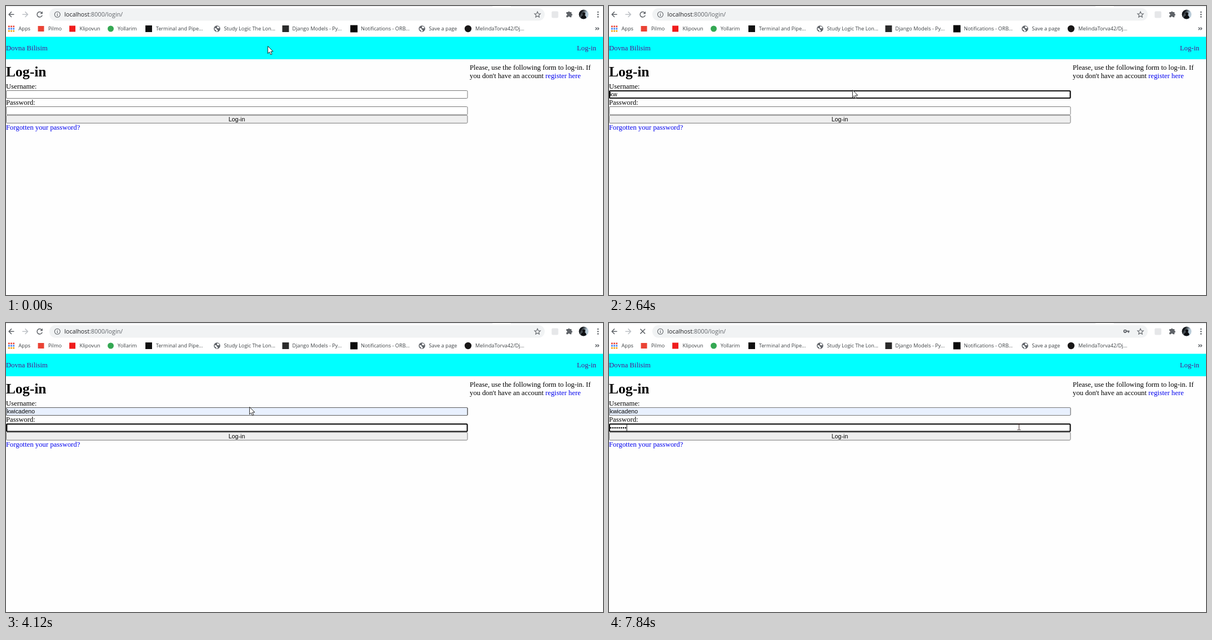
An HTML page that plays this animation: 1075 by 521 pixels, repeating every 8000 ms.

```html
<!DOCTYPE html>
<html lang="en">
<head>
<meta charset="utf-8">
<title>Log-in</title>
<style>
html, body { margin: 0; width: 100%; height: 100%; overflow: hidden; background: #fefefe; }
svg { display: block; width: 1075px; height: 521px; }
.ui { font-family: "Open Sans", "Noto Sans", sans-serif; fill: #3c4043; }
.marks { font-size: 9.2px; }
.url { font-size: 10.8px; fill: #5f6368; }
.page { font: 12.8px "Liberation Serif", serif; fill: #000; }
.page h1, .head { font-size: 25.6px; font-weight: bold; }
.link { fill: #0000ee; }
.seen { fill: #551a8b; }
.field { font: 10.67px "Liberation Sans", sans-serif; fill: #000; }
.list { font-size: 10.1px; fill: #202124; }
.line { fill: none; stroke: #5f6368; stroke-width: 1.5; }
.box { fill: #fff; stroke: #767676; }
.focus { fill: none; stroke: #101010; stroke-width: 2; }

/* one timeline of 8 s, hard changes unless a keyframe says otherwise */
.t { animation: 8s step-end infinite; }
.off { opacity: 0; }
#arrow { animation-name: arrow; }
#beam { animation-name: beam; }
#halo { animation-name: halo; }
#hoverUser { animation-name: hoverUser; }
#focusUser { animation-name: focusUser; }
#caretUser { animation-name: caretUser; }
#typed { animation-name: typed; }
#filled { animation-name: filled; }
#menu { animation-name: menu; }
#pick { animation-name: pick; }
#focusPass { animation-name: focusPass; }
#cover { animation-name: cover; }
#caretPass { animation-name: caretPass; }
#key { animation-name: key; }
#reload { animation-name: reload; }
#stop { animation-name: stop; }
#hoverBtn { animation-name: hoverBtn; }

@keyframes arrow {
  0% { transform: translate(471px, 72px); opacity: 1; }
  .875% { transform: translate(465px, 80px); }
  3.25% { transform: translate(465px, 80px); animation-timing-function: steps(10, jump-both); }
  12.5% { transform: translate(438px, 151px); }
  94.125% { transform: translate(478px, 164px); }
  95.125% { transform: translate(575px, 192px); }
  96.125% { transform: translate(655px, 205px); }
  97% { transform: translate(711px, 200px); }
  98% { transform: translate(738px, 187px); opacity: 0; }
  100% { opacity: 0; }
}
@keyframes beam { 0% { opacity: 0; } 98%, 100% { opacity: 1; } }
@keyframes halo { 0% { opacity: 0; } 13.625% { opacity: .62; } 14.625%, 100% { opacity: 0; } }
@keyframes hoverUser { 0% { opacity: 0; } 12.5% { opacity: 1; } 95.125%, 100% { opacity: 0; } }
@keyframes focusUser { 0% { opacity: 0; } 14.625% { opacity: 1; } 51.5%, 100% { opacity: 0; } }
@keyframes caretUser {
  0% { opacity: 0; transform: none; }
  14.625% { opacity: 1; }
  22.25% { opacity: 0; }
  27% { opacity: 1; transform: translateX(13px); }
  33% { opacity: 0; }
  40.875% { opacity: 1; }
  47.5% { opacity: 0; }
  49.375% { opacity: 1; transform: translateX(50.4px); }
  51.5%, 100% { opacity: 0; }
}
@keyframes typed { 0% { opacity: 0; } 27% { opacity: 1; } 47.5%, 100% { opacity: 0; } }
@keyframes filled { 0% { opacity: 0; } 47.5%, 100% { opacity: 1; } }
@keyframes menu { 0% { opacity: 0; } 37.75% { opacity: 1; } 49.375%, 100% { opacity: 0; } }
@keyframes pick { 0% { opacity: 0; } 46.5%, 100% { opacity: 1; } }
@keyframes focusPass { 0% { opacity: 0; } 51.5%, 100% { opacity: 1; } }
@keyframes cover {
  0% { transform: translateX(0); }
  65% { transform: translateX(3.78px); }
  69.875% { transform: translateX(7.56px); }
  70.875% { transform: translateX(11.34px); }
  73.75% { transform: translateX(15.12px); }
  75.875% { transform: translateX(18.9px); }
  77.75% { transform: translateX(22.68px); }
  80.625% { transform: translateX(26.46px); }
  82.5%, 100% { transform: translateX(30.24px); }
}
@keyframes caretPass {
  0% { opacity: 0; }
  51.5% { opacity: 1; }
  58.375% { opacity: 0; }
  65% { opacity: 1; }
  89.5% { opacity: 0; }
  96.125%, 100% { opacity: 1; }
}
@keyframes key { 0% { opacity: 0; } 67.125%, 100% { opacity: 1; } }
@keyframes reload { 0% { opacity: 1; } 90.625%, 100% { opacity: 0; } }
@keyframes stop { 0% { opacity: 0; } 90.625%, 100% { opacity: 1; } }
@keyframes hoverBtn { 0% { opacity: 0; } 95.125% { opacity: 1; } 98%, 100% { opacity: 0; } }
</style>
</head>
<body>
<svg viewBox="0 0 1075 521" xmlns="http://www.w3.org/2000/svg">
  <defs>
    <linearGradient id="photo" x1="0" y1="0" x2="1" y2=".6">
      <stop offset=".3" stop-color="#15181c"/>
      <stop offset=".75" stop-color="#b9cbd8"/>
    </linearGradient>
    <filter id="soft" x="-10%" y="-10%" width="120%" height="120%">
      <feDropShadow dx="0" dy="1" stdDeviation="1.1" flood-opacity=".4"/>
    </filter>
    <g id="globe">
      <circle r="5.8" fill="#5f6368"/>
      <path d="M-4.2-1.6l3.4 1.2.4 1.8 2 1-.8 2.4-2 .2-.6-2.2-2.4-1.4zM.2-4.4l3 .6 1.2 2.6-2.4.8-2.2-1.4z" fill="#fff"/>
    </g>
  </defs>

  <!-- browser bar -->
  <rect width="1075" height="55" fill="#fff"/>
  <path d="M0 .5h876M909 .5h166" stroke="#e3e5e9"/>
  <rect x="78" y="4" width="892" height="22.5" rx="11.2" fill="#f1f3f4"/>
  <g class="line">
    <path d="M14.6 15.2H5.2m4.8-4.8l-4.8 4.8 4.8 4.8"/>
    <path d="M29.4 15.2h9.8m-4.8-4.8l4.8 4.8-4.8 4.8" stroke="#bdc1c6"/>
    <g id="reload" class="t">
      <path d="M64.2 12.2A4.7 4.7 0 1 0 65.2 16.6"/>
      <path d="M65.9 9.6v4.6h-4.6z" fill="#5f6368" stroke="none"/>
    </g>
    <path id="stop" class="t off" d="M56.4 10.8l8.6 8.6m0-8.6l-8.6 8.6"/>
    <circle cx="92.5" cy="15.3" r="5" stroke-width="1.1"/>
    <path d="M92.5 14.6v3.4m0-5.6v1.2" stroke-width="1.2"/>
    <path d="M957 10.2l1.5 3.5 3.8.3-2.9 2.5.9 3.7-3.3-2-3.3 2 .9-3.7-2.9-2.5 3.8-.3z" stroke-width="1.1"/>
    <g id="key" class="t off">
      <circle cx="929.3" cy="14.8" r="2.2" stroke-width="1.8"/>
      <path d="M931.5 14.8h5.8m-1.8 0v2.9" stroke-width="1.9"/>
    </g>
  </g>
  <rect x="982.5" y="9.5" width="12" height="12" rx="2" fill="#e6e7e9"/>
  <path d="M1009 12h3a1.7 1.7 0 0 1 3.3 0h3v3.1a1.6 1.6 0 0 1 0 3.2v3h-3.1a1.6 1.6 0 0 0-3.2 0h-3v-3.1a1.6 1.6 0 0 0 0-3.2z" transform="translate(0 -1)" fill="#5f6368"/>
  <circle cx="1040.2" cy="15.2" r="8.6" fill="url(#photo)"/>
  <path d="M1035 21.8q.4-5 4-5.4a2.6 2.6 0 1 1 3 0q2.6.8 3 5.2-5 3.600-10 .2z" fill="#0e1013"/>
  <g fill="#5f6368"><circle cx="1066" cy="11" r="1.3"/><circle cx="1066" cy="15.3" r="1.3"/><circle cx="1066" cy="19.600" r="1.3"/></g>
  <text class="ui url" x="105" y="19"><tspan fill="#202124">localhost</tspan>:8000/login/</text>

  <!-- bookmarks -->
  <g stroke-width="2.8" stroke-dasharray="2.8 1.4">
    <path d="M4 36.800h11.200" stroke="#ea4335"/>
    <path d="M4 41h11.200" stroke="#4285f4"/>
    <path d="M4 45.200h11.200" stroke="#f4a20a"/>
  </g>
  <rect x="57.500" y="36" width="11" height="10" fill="#ea4335"/>
  <rect x="114" y="35.500" width="11" height="11" fill="#f01c1c"/>
  <circle cx="188.500" cy="41" r="5.500" fill="#34a853"/>
  <rect x="251" y="35" width="12" height="12" fill="#111"/>
  <use href="#globe" x="380" y="41"/>
  <rect x="497.500" y="35" width="12" height="12" fill="#2b2b2b"/>
  <rect x="620" y="34.500" width="13" height="13" fill="#0a0a0a"/>
  <use href="#globe" x="749" y="41"/>
  <circle cx="832" cy="41" r="6.200" fill="#191717"/>
  <g class="ui marks">
    <text x="22.500" y="44.300">Apps</text>
    <text x="76" y="44.300">Pilmo</text>
    <text x="132.500" y="44.300">Klipovun</text>
    <text x="201" y="44.300">Yollarim</text>
    <text x="270" y="44.300">Terminal and Pipe...</text>
    <text x="392.500" y="44.300">Study Logic The Lon...</text>
    <text x="515.500" y="44.300">Django Models - Py...</text>
    <text x="639" y="44.300">Notifications - ORB...</text>
    <text x="761.500" y="44.300">Save a page</text>
    <text x="845" y="44.300">MelindaTorva42/Dj...</text>
  </g>
  <path class="line" d="M1061.500 38.500l2.300 2.300-2.300 2.300m3.600-4.600l2.300 2.300-2.300 2.300" stroke-width="1.100"/>

  <!-- page -->
  <rect y="55.500" width="1075" height="40.500" fill="#0ff"/>
  <g class="page">
    <text class="seen" x="0" y="80">Dovna Bilisim</text>
    <text class="seen" x="1028" y="80">Log-in</text>
    <text class="head" x="0" y="127">Log-in</text>
    <text x="0" y="149">Username:</text>
    <text x="0" y="178.300">Password:</text>
    <text class="link" x="0" y="223">Forgotten your password?</text>
    <text x="835" y="115">Please, use the following form to log-in. If</text>
    <text x="835" y="129.700">you don't have an account <tspan class="link">register here</tspan></text>
  </g>

  <g class="field">
    <rect class="box" x=".5" y="152.500" width="830.500" height="14" rx="1.500"/>
    <text id="typed" class="t off" x="1.600" y="163">kw</text>
    <g id="filled" class="t off">
      <rect class="box" x=".5" y="152.500" width="830.500" height="14" rx="1.500" style="fill:#e8f0fe"/>
      <text x="1.600" y="163">kwicadeno</text>
    </g>
    <rect id="hoverUser" class="t off" x=".5" y="152.500" width="830.500" height="14" rx="1.500" fill="none" stroke="#5a5a5a"/>
    <rect id="focusUser" class="t off focus" x="1" y="153" width="829.500" height="13" rx="1.500"/>
    <rect id="caretUser" class="t off" x="1.400" y="153.500" width="1" height="12"/>

    <rect class="box" x=".5" y="181.500" width="830.500" height="14.500" rx="1.500"/>
    <path d="M3.290 189h26.500" stroke="#000" stroke-width="2.700" stroke-linecap="round" stroke-dasharray="0 3.780"/>
    <g id="cover" class="t">
      <rect x="1.900" y="184" width="34" height="10" fill="#fff"/>
      <rect id="caretPass" class="t off" x="1.400" y="183" width="1" height="12"/>
    </g>
    <rect id="focusPass" class="t off focus" x="1" y="182.300" width="829.500" height="13.200" rx="1.500"/>

    <rect x=".5" y="197" width="830.500" height="14.200" rx="1.800" fill="#efefef" stroke="#767676"/>
    <rect id="hoverBtn" class="t off" x=".5" y="197" width="830.500" height="14.200" rx="1.800" fill="#e5e5e5" stroke="#4f4f4f"/>
    <text x="415.500" y="207.800" text-anchor="middle">Log-in</text>
  </g>

  <!-- suggestions -->
  <g id="menu" class="t off">
    <path d="M-4 169h157v182.500a2 2 0 0 1-2 2h-155z" fill="#fff" filter="url(#soft)"/>
    <rect id="pick" class="t off" x="0" y="174" width="153" height="29" fill="#c6c6c8"/>
    <g class="ui list">
      <text x="9.500" y="192.500">kwicadeno</text>
      <text x="9.500" y="221.300">kwicadeno@g.example</text>
      <text x="9.500" y="250.100">kwicadeno1</text>
      <text x="9.500" y="278.900">kwic</text>
      <text x="9.500" y="307.700">kwicadeno@m.example</text>
      <text x="9.500" y="336.500">kwicatunda@g.example</text>
    </g>
  </g>

  <!-- pointer -->
  <circle id="halo" class="t off" cx="438" cy="152" r="9.500" fill="#ff0"/>
  <path id="arrow" class="t" d="M.5.5v13.200l3-2.900 2.200 5 2.200-1-2.100-4.800h4.200z" fill="#fff" stroke="#111" stroke-width=".9"/>
  <path id="beam" class="t off" d="M735.500 181.500h2l.8.700.8-.700h2m-2.800.500v10m-2.800.500h2l.8-.700.8.700h2" fill="none" stroke="#3a2626"/>
</svg>
</body>
</html>
```
